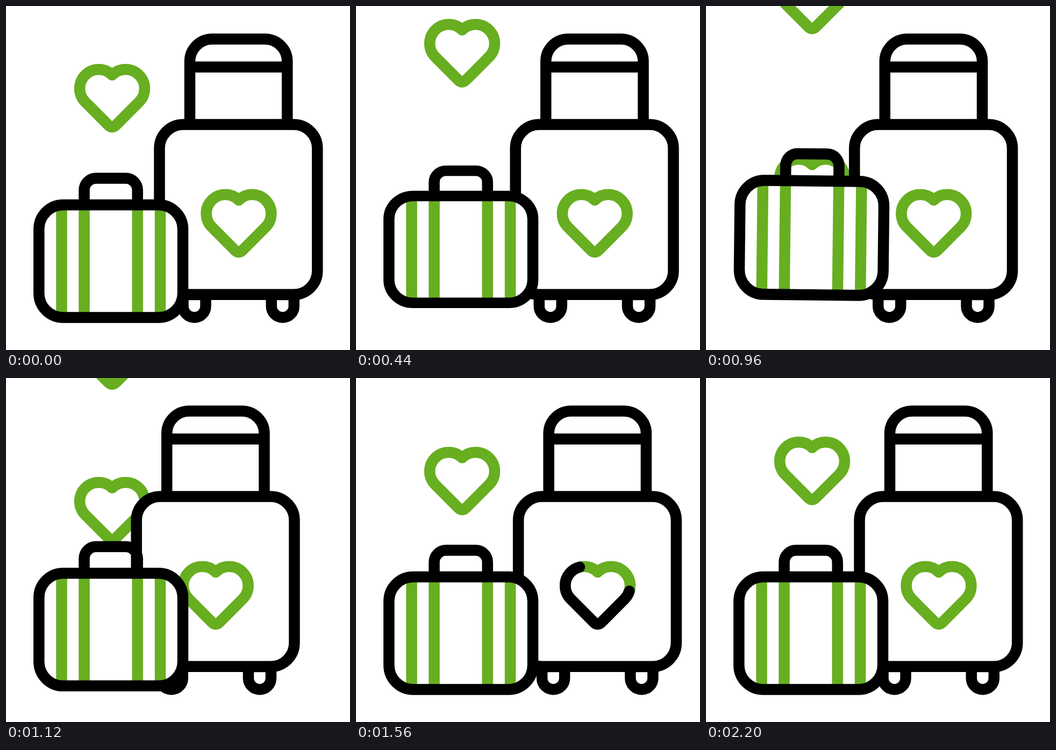
An HTML page with a canvas for the animation above (2.24 s loop, 640x640 px).

```html
<!DOCTYPE html>
<html lang="en">
<head>
<meta charset="utf-8">
<title>Luggage</title>
<style>
  html, body { margin: 0; width: 100%; height: 100%; overflow: hidden; background: #fff; }
  canvas { display: block; }
</style>
</head>
<body>
<canvas id="stage" width="640" height="640"></canvas>
<script>
const ctx = document.getElementById('stage').getContext('2d');
const GREEN = '#67ae20', BLACK = '#000';
const STEP = 40, STEPS = 56;

// Heart, clockwise from the notch; the origin is the notch axis at lobe-centre height.
const R = 35.4, LOBE = 25, TIP = 75.2;
const heart = new Path2D();
heart.arc(LOBE, 0, R, -Math.PI * 3 / 4, Math.PI / 4);
heart.lineTo(7, TIP - 7);
heart.quadraticCurveTo(0, TIP, -7, TIP - 7);
heart.arc(-LOBE, 0, R, Math.PI * 3 / 4, Math.PI * 7 / 4);
heart.closePath();
const HEART_LENGTH = 361;

const trolleyHandle = new Path2D('M342 220V103a41.5 41.5 0 0 1 41.5-41.5h98.3a41.5 41.5 0 0 1 41.5 41.5V220M342 113.5h181.3');
const wheel = new Path2D('M-21 537v21.5a21 21 0 0 0 42 0V537z');
const caseHandle = new Path2D('M145.5 370v-27.5a22 22 0 0 1 22-22h55.2a22 22 0 0 1 22 22V370');
const stripes = new Path2D('M103.5 370v209M145.5 370v209M244.7 370v209M287 370v209');

const box = (x, y, w, h, r) => {
  const p = new Path2D();
  p.roundRect(x, y, w, h, r);
  return p;
};
const trolleyBody = box(285.5, 220.5, 293.8, 316.3, 44);
const caseBody = box(61.3, 370, 267.7, 209.4, 45);

// Keys are [step, value]; each stretch eases in and out.
function track(f, keys) {
  if (f <= keys[0][0]) return keys[0][1];
  for (let i = 1; i < keys.length; i++) {
    const [a, from] = keys[i - 1], [b, to] = keys[i];
    if (f < b) {
      const p = (f - a) / (b - a);
      return from + (to - from) * p * p * (3 - 2 * p);
    }
  }
  return keys[keys.length - 1][1];
}

function at(x, y, draw) {
  ctx.save();
  ctx.translate(x, y);
  draw();
  ctx.restore();
}

function line(path, color, filled) {
  if (filled) {
    ctx.fillStyle = '#fff';
    ctx.fill(path);
  }
  ctx.strokeStyle = color;
  ctx.stroke(path);
}

function floatingHearts(f) {
  if (f < 34) at(197.5, 153.5 - 7.62 * f, () => line(heart, GREEN));
  if (f > 19) {
    const drop = f < 30 ? 30.7 + 22.7 * (30 - f) : 1.18 * (STEPS - f);
    at(197.5, 153.5 + drop, () => line(heart, GREEN));
  }
}

function trolleyHeart(f) {
  line(heart, GREEN);
  const head = track(f, [[29, 0], [41.5, 1]]);
  const tail = track(f, [[34, 0], [49, 1]]);
  if (head <= tail) return;
  ctx.setLineDash([(head - tail) * HEART_LENGTH, 2 * HEART_LENGTH]);
  ctx.lineDashOffset = -tail * HEART_LENGTH;
  line(heart, BLACK);
}

function trolley(f) {
  const x = track(f, [[7, 0], [18, 37.3], [29, -44.7], [39, 16.6], [49, 0]]);
  at(x, 0, () => {
    line(trolleyHandle, BLACK);
    for (const cx of [350.5, 514.8]) at(cx, 0, () => line(wheel, BLACK, true));
    line(trolleyBody, BLACK, true);
    at(433, 386.2, () => trolleyHeart(f));
  });
}

function smallCase(f) {
  const y = track(f, [[4.5, 0], [19.5, -69], [30, 0]]);
  const squash = track(f, [[0, 1], [7, 0.915], [18, 1.03], [29, 1]]);
  const tilt = track(f, [[11.8, 0], [16.25, -3.8], [20.7, 3.8], [25.15, 0]]);
  at(195.2, 590 + y, () => {
    ctx.rotate(tilt * Math.PI / 180);
    ctx.scale(1, squash);
    ctx.translate(-195.2, -590);
    line(caseHandle, BLACK);
    ctx.fillStyle = '#fff';
    ctx.fill(caseBody);
    ctx.lineCap = 'butt';
    line(stripes, GREEN);
    line(caseBody, BLACK);
  });
}

function frame(now) {
  const f = Math.floor(now / STEP) % STEPS;
  ctx.fillStyle = '#fff';
  ctx.fillRect(0, 0, 640, 640);
  ctx.lineWidth = 20.5;
  ctx.lineCap = ctx.lineJoin = 'round';
  floatingHearts(f);
  trolley(f);
  smallCase(f);
}

const start = performance.now();
function tick() {
  frame(performance.now() - start);
  requestAnimationFrame(tick);
}
tick();
</script>
</body>
</html>
```
